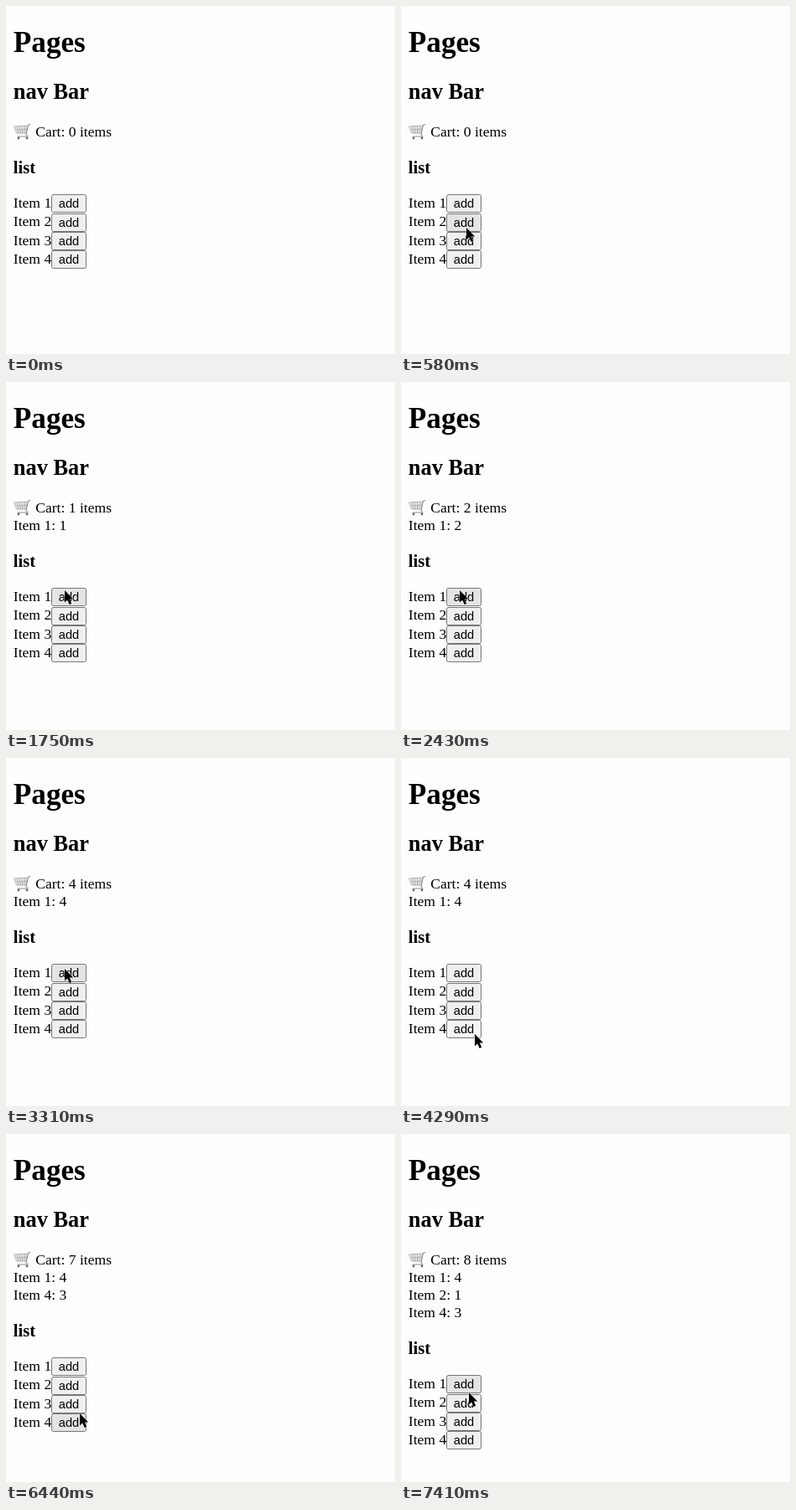
An HTML page with a canvas for the animation above (8000 ms loop, 464x416 px).

```html
<!DOCTYPE html>
<html lang="en">
<head>
<meta charset="utf-8">
<title>Cart</title>
<style>
  html, body { margin: 0; width: 100%; height: 100%; overflow: hidden; background: #fdfdfd; }
  canvas { display: block; }
</style>
</head>
<body>
<canvas id="stage" width="464" height="416"></canvas>
<script>
const ctx = document.getElementById('stage').getContext('2d');
const LOOP = 8000, TICK = 97.6; // the screen refreshes once per tick
const ZOOM = 1.1, EM = 16 * ZOOM, LEFT = 8 * ZOOM;
const SERIF = '"Liberation Serif", serif';
const SANS = '"Liberation Sans", sans-serif';
const PITCH = 22.35, LINE = 21;
const BTN = { x: 54, w: 42, h: 22 };
const GREY = { idle: '#efefef', hover: '#e4e4e4', pressed: '#f5f5f5' };

// Pointer glides, in ticks
const START = { x: 243, y: 388 };
const GLIDES = [
  { from: 1, to: 6, x: 78, y: 265 },
  { from: 6, to: 10, x: 70, y: 243 },
  { from: 14, to: 17, x: 70, y: 249 },
  { from: 32, to: 34, x: 70, y: 252 },
  { from: 36, to: 42, x: 88, y: 330 },
  { from: 45, to: 48, x: 88, y: 345 },
  { from: 63, to: 66, x: 88, y: 334 },
  { from: 66, to: 72, x: 81, y: 309 }
];

// Ticks at which each item is added; its button goes down one tick earlier
const ADDS = [[13, 20, 29, 33], [75], [], [45, 51, 60]];

const easeOut = k => 1 - (1 - k) ** 1.5;

function pointerAt(tick) {
  if (tick < GLIDES[0].from) return null;
  let { x, y } = START;
  for (const g of GLIDES) {
    const k = easeOut(Math.min(1, Math.max(0, (tick - g.from) / (g.to - g.from))));
    x += (g.x - x) * k;
    y += (g.y - y) * k;
  }
  return { x: Math.round(x), y: Math.round(y) };
}

function text(str, x, y, size = EM, family = SERIF, weight = 'normal') {
  ctx.font = `${weight} ${size}px ${family}`;
  ctx.fillStyle = '#000';
  ctx.fillText(str, x, y);
}

const heading = (str, y, scale) => text(str, LEFT, y, EM * scale, SERIF, 'bold');

function drawCart() {
  ctx.lineWidth = 0.8;
  ctx.lineJoin = ctx.lineCap = 'round';
  ctx.fillStyle = '#e6e7e8';
  ctx.strokeStyle = '#a4a6a8';
  const basket = new Path2D('M10 144L25.5 143L24 152L13 152Z');
  ctx.fill(basket);
  ctx.stroke(basket);
  ctx.beginPath();
  for (let i = 1; i < 5; i++) {
    ctx.moveTo(10 + i * 3.1, 144);
    ctx.lineTo(13 + i * 2.2, 152);
  }
  ctx.moveTo(11.5, 148);
  ctx.lineTo(24.7, 147.5);
  ctx.stroke();
  ctx.lineWidth = 1.1;
  ctx.strokeStyle = '#8c8e90';
  ctx.stroke(new Path2D('M29 141.5L26.5 142L24 153.5L26 156H14'));
  ctx.fillStyle = '#66686a';
  for (const x of [15, 25]) {
    ctx.beginPath();
    ctx.arc(x, 158, 1.4, 0, Math.PI * 2);
    ctx.fill();
  }
}

function drawButton(y, fill) {
  ctx.beginPath();
  ctx.roundRect(BTN.x + 0.5, y + 0.5, BTN.w - 1, BTN.h - 1, 2);
  ctx.fillStyle = fill;
  ctx.fill();
  ctx.lineWidth = 1;
  ctx.strokeStyle = '#767676';
  ctx.stroke();
  text('add', 62.8, y + 16, EM * 5 / 6, SANS);
}

function drawPointer({ x, y }) {
  const arrow = new Path2D('M0 0V14.5L3.3 11.5L5.6 17L8.2 15.9L5.9 10.6L10.2 10.4Z');
  ctx.save();
  ctx.translate(x, y);
  ctx.strokeStyle = 'rgba(255, 255, 255, 0.7)';
  ctx.stroke(arrow);
  ctx.fillStyle = '#000';
  ctx.fill(arrow);
  ctx.restore();
}

function isOver(p, top) {
  return p && p.x >= BTN.x && p.x < BTN.x + BTN.w && p.y >= top && p.y < top + BTN.h;
}

function draw(ms) {
  const tick = Math.floor((ms + 8) / TICK);
  const pointer = pointerAt(tick);
  const counts = ADDS.map(times => times.filter(t => t <= tick).length);
  const total = counts.reduce((a, b) => a + b);

  ctx.fillStyle = '#fdfdfd';
  ctx.fillRect(0, 0, 464, 416);
  heading('Pages', 55, 2);
  heading('nav Bar', 111, 1.5);
  drawCart();
  text(`Cart: ${total} items`, 35.2, 156);

  let shift = 0;
  counts.forEach((n, i) => {
    if (!n) return;
    shift += LINE;
    text(`Item ${i + 1}: ${n}`, LEFT, 156 + shift);
  });

  heading('list', 200 + shift, 1.17);
  ADDS.forEach((times, i) => {
    const top = Math.round(225.3 + PITCH * i) + shift;
    const state = times.includes(tick + 1) ? 'pressed' : isOver(pointer, top) ? 'hover' : 'idle';
    text(`Item ${i + 1}`, LEFT, Math.round(241 + PITCH * i) + shift);
    drawButton(top, GREY[state]);
  });

  if (pointer) drawPointer(pointer);
}

function frame() {
  draw(performance.now() % LOOP);
  requestAnimationFrame(frame);
}
frame();
</script>
</body>
</html>
```
